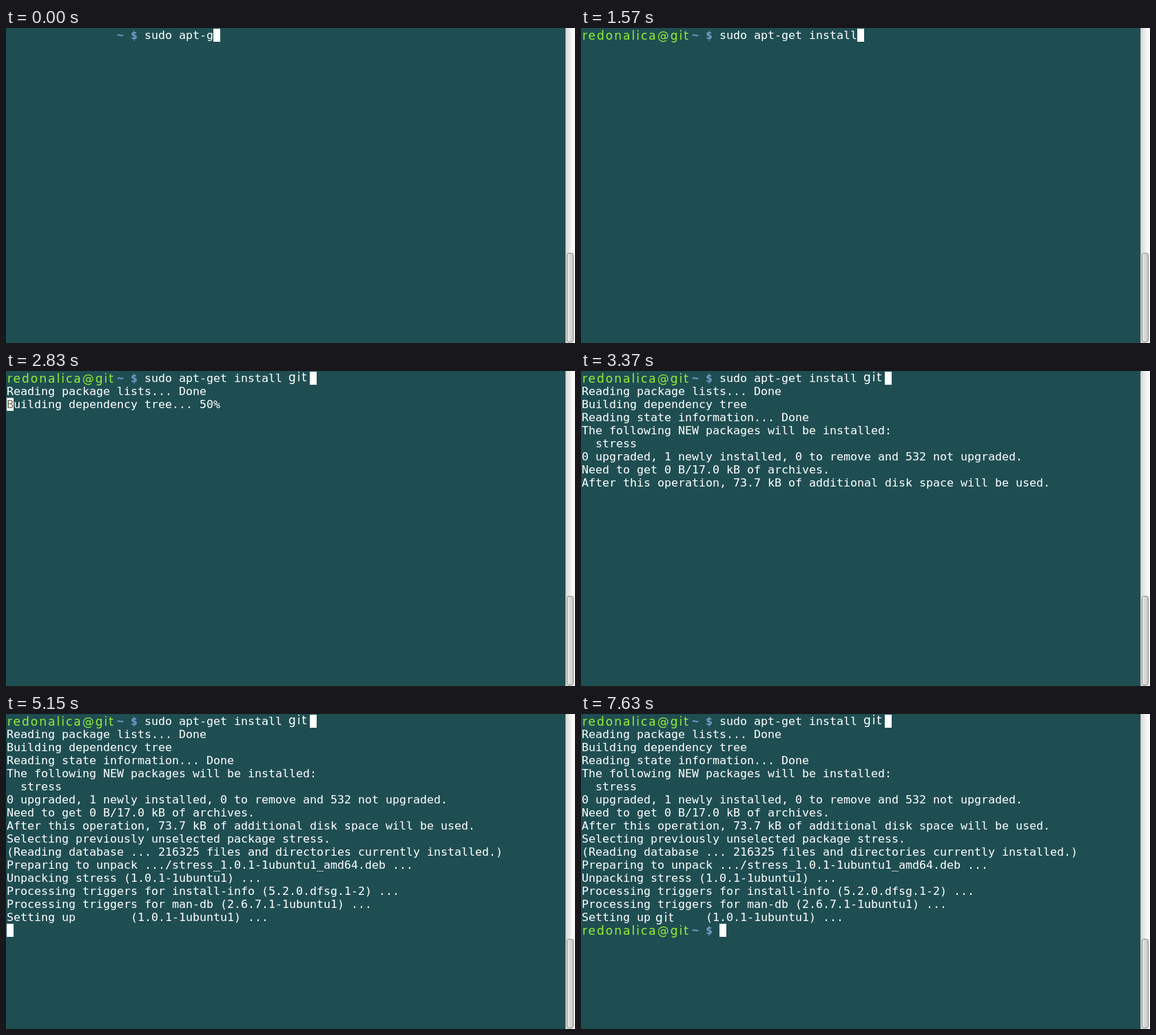
An HTML page for the animation above (8 s loop, 826x458 px).

```html
<!DOCTYPE html>
<html lang="en">
<head>
<meta charset="utf-8">
<title>Terminal</title>
<style>
html, body { margin: 0; width: 100%; height: 100%; overflow: hidden; background: #1f4e52; }
span, i { position: absolute; white-space: pre; }
span { color: #fff; font: 16.61px/19px "DejaVu Sans Mono", monospace; }
.bold { color: #729fcf; font-weight: bold; }
.sans { font: 17px/20px "DejaVu Sans", sans-serif; letter-spacing: 2px; }
.user { color: #93f038; }
.cursor { width: 10px; height: 19px; background: #fff; color: #77705f; }
.track { left: 812px; top: 0; width: 14px; height: 458px; box-sizing: border-box;
  border-left: 1px solid #b4b4b2; background: linear-gradient(90deg, #d9d9d9, #f8f8f8 70%); }
.thumb { left: 814px; top: 327px; width: 10px; height: 130px; box-sizing: border-box;
  border: 1px solid #8c8c8a; border-radius: 3px; background: linear-gradient(90deg, #e6e6e6, #c9c9c9); }
</style>
</head>
<body>
<i class="track"></i><i class="thumb"></i>
<script>
const LOOP = 8000;
const CELL = 10, LINE = 19, COMMAND = "sudo apt-get install ";
const parts = [];

function add(text, x, y, from = 0, to = LOOP, cls = "") {
  const el = document.createElement("span");
  el.className = cls;
  el.textContent = text;
  el.style.left = x + "px";
  el.style.top = y + "px";
  document.body.append(el);
  parts.push({ el, from, to });
  return el;
}
const rowY = row => 1 + LINE * row;
const line = (row, from, text, to) => add(text, 1, rowY(row), from, to);
const cursor = (row, from, to, char = "", col = 0) =>
  add(char, 1 + CELL * col, rowY(row), from, to, "cursor");

function prompt(row, from, nameFrom) {
  add("redonalica@git", 2, rowY(row), nameFrom, LOOP, "sans user");
  add("~ $", 161, rowY(row), from, LOOP, "bold");
}

// Command line
prompt(0, 0, 40);
const keys = [160, 280, 400, 810, 1060, 1150, 1240, 1330, 1420, 1570, 1670, 1780, 1950, 2270];
const typed = add("", 201, rowY(0));
const caret = cursor(0, 0, LOOP);
add("g", 410, -1, 2050, LOOP, "sans");
add("i", 422.8, -1, 2360, LOOP, "sans");
add("t", 429.5, -1, 2460, LOOP, "sans");

// Package lists
cursor(1, 2710, 2750);
line(1, 2750, "Reading package lists... 0%", 2790);
cursor(1, 2750, 2790, "R");
line(1, 2790, "Reading package lists... Done");
line(2, 2790, "Building dependency tree... 0%", 2830);
line(2, 2830, "Building dependency tree... 50%", 3050);
cursor(2, 2790, 3050, "B");
line(2, 3050, "Building dependency tree");
line(3, 3050, "Reading state information... Done");
cursor(4, 3050, 3270);

// Summary
line(4, 3270, "The following NEW packages will be installed:");
line(5, 3270, "  stress");
line(6, 3320, "0 upgraded, 1 newly installed, 0 to remove and 532 not upgraded.");
line(7, 3370, "Need to get 0 B/17.0 kB of archives.");
line(8, 3370, "After this operation, 73.7 kB of additional disk space will be used.");

// Unpacking
line(9, 3700, "Selecting previously unselected package stress.");
line(10, 3740, "(Reading database ... 55%", 3780);
line(10, 3780, "(Reading database ... 216325 files and directories currently installed.)");
line(11, 3820, "Preparing to unpack .../stress_1.0.1-1ubuntu1_amd64.deb ...");
line(12, 3860, "Unpacking stress (1.0.1-1ubuntu1) ...");
cursor(13, 3860, 4200);
line(13, 4200, "Processing triggers for install-info (5.2.0.dfsg.1-2) ...");
cursor(14, 4200, 4440);
line(14, 4440, "Processing triggers for man-db (2.6.7.1-1ubuntu1) ...");
cursor(15, 4480, 5050);
line(15, 5050, "Setting up        (1.0.1-1ubuntu1) ...");
add("git", 108, 286, 5640, LOOP, "sans");
cursor(16, 5150, 5740);
cursor(16, 6340, 6940);

// Back at the prompt
prompt(16, 7100, 7630);
cursor(16, 7530, LOOP, "", 20);

const start = performance.now();
function draw() {
  const t = Math.max(0, performance.now() - start) % LOOP;
  for (const { el, from, to } of parts)
    el.style.visibility = t >= from && t < to ? "visible" : "hidden";
  const count = 10 + keys.filter(k => k <= t).length;
  typed.textContent = COMMAND.slice(0, count);
  caret.style.left = 201 + CELL * count + "px";
  requestAnimationFrame(draw);
}
draw();
</script>
</body>
</html>
```
